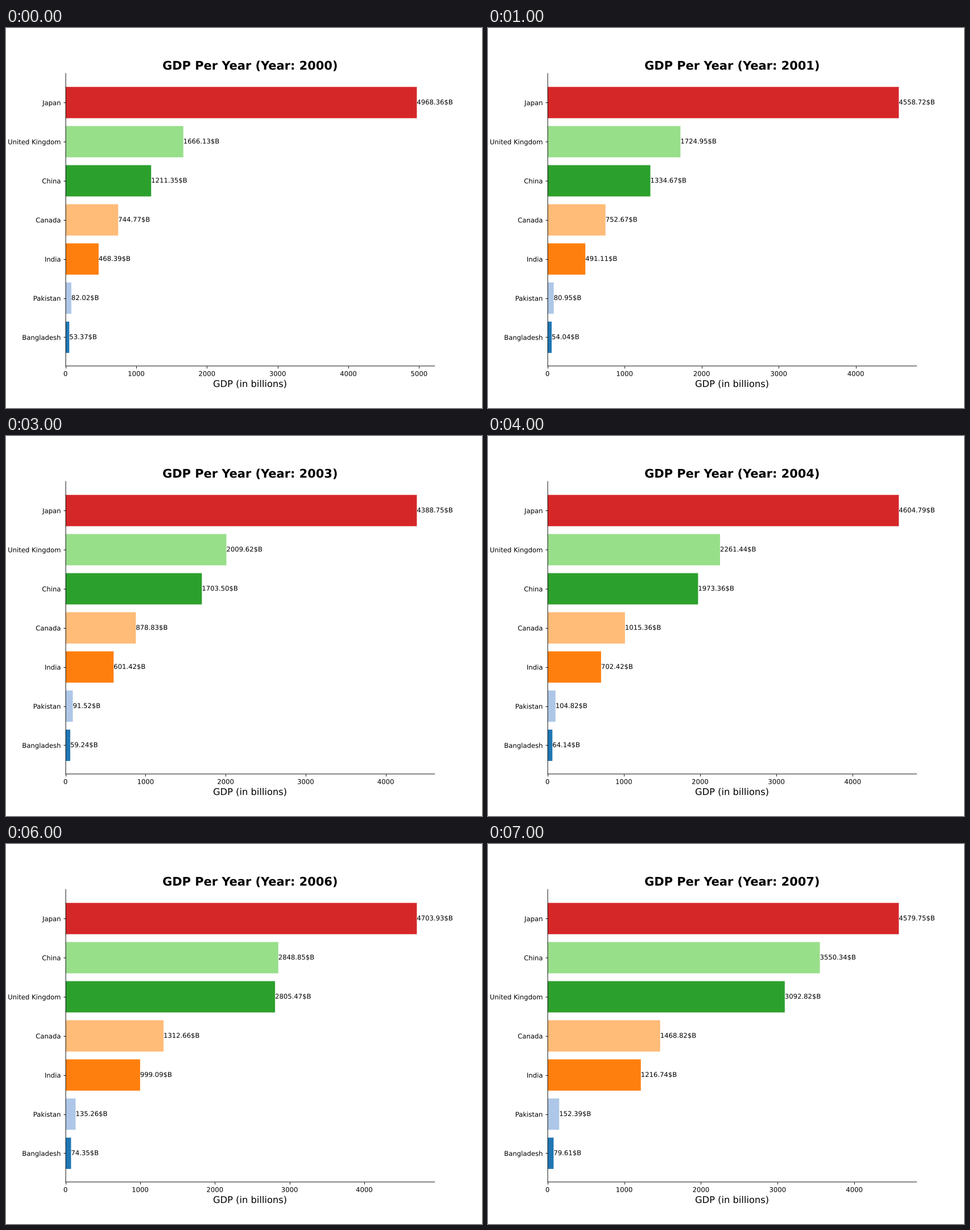
A matplotlib script for the animation above (8 s loop, 837 px wide and 669 px high).

```python
import numpy as np
import matplotlib.pyplot as plt
from matplotlib.animation import FuncAnimation
from matplotlib.patheffects import Normal
from matplotlib.transforms import Affine2D

W, H, DPI = 837, 669, 83.7
YEARS = range(2000, 2008)

# GDP in billions of dollars at the key years; growth is exponential between
KEY_YEARS = 2000, 2002, 2005, 2007
GDP = {
    "Bangladesh": (53.37, 54.72, 69.44, 79.61),
    "Pakistan": (82.02, 79.90, 120.06, 152.39),
    "India": (468.39, 514.94, 820.38, 1216.74),
    "Canada": (744.77, 760.65, 1173.11, 1468.82),
    "China": (1211.35, 1470.55, 2285.97, 3550.34),
    "United Kingdom": (1666.13, 1785.84, 2544.81, 3092.82),
    "Japan": (4968.36, 4182.85, 4831.47, 4579.75),
}
COLORS = plt.get_cmap("tab20").colors[:len(GDP)]

# Path effects draw the text as smooth outlines at sub-pixel positions
plt.rcParams.update({
    "font.family": "DejaVu Sans",
    "text.hinting": "none",
    "path.effects": [Normal()],
})

# The tiny margin keeps the pixel size from rounding down
fig, ax = plt.subplots(figsize=((W + 1e-6) / DPI, (H + 1e-6) / DPI), dpi=DPI)


def gdp(name, year):
    return np.exp(np.interp(year, KEY_YEARS, np.log(GDP[name])))


def draw(year):
    ax.clear()
    values = {name: gdp(name, year) for name in GDP}
    ranked = sorted(values, key=values.get)
    ax.barh(ranked, [values[name] for name in ranked], color=COLORS, snap=False)
    for row, name in enumerate(ranked):
        ax.text(values[name], row, f"{values[name]:.2f}$B", va="center")

    ax.set_title(f"GDP Per Year (Year: {year})", fontsize=18, fontweight="bold")
    ax.set_xlabel("GDP (in billions)", fontsize=14)
    ax.spines[["top", "right"]].set_visible(False)
    # Soft axis lines, lying just inside the plot area
    for side in ("left", "bottom"):
        spine = ax.spines[side]
        spine.set_snap(False)
        spine.set_transform(spine.get_spine_transform()
                            + Affine2D().translate(0.42, 0.42))


anim = FuncAnimation(fig, draw, frames=YEARS, interval=1000,
                     repeat=True, repeat_delay=0)
plt.show()
```
